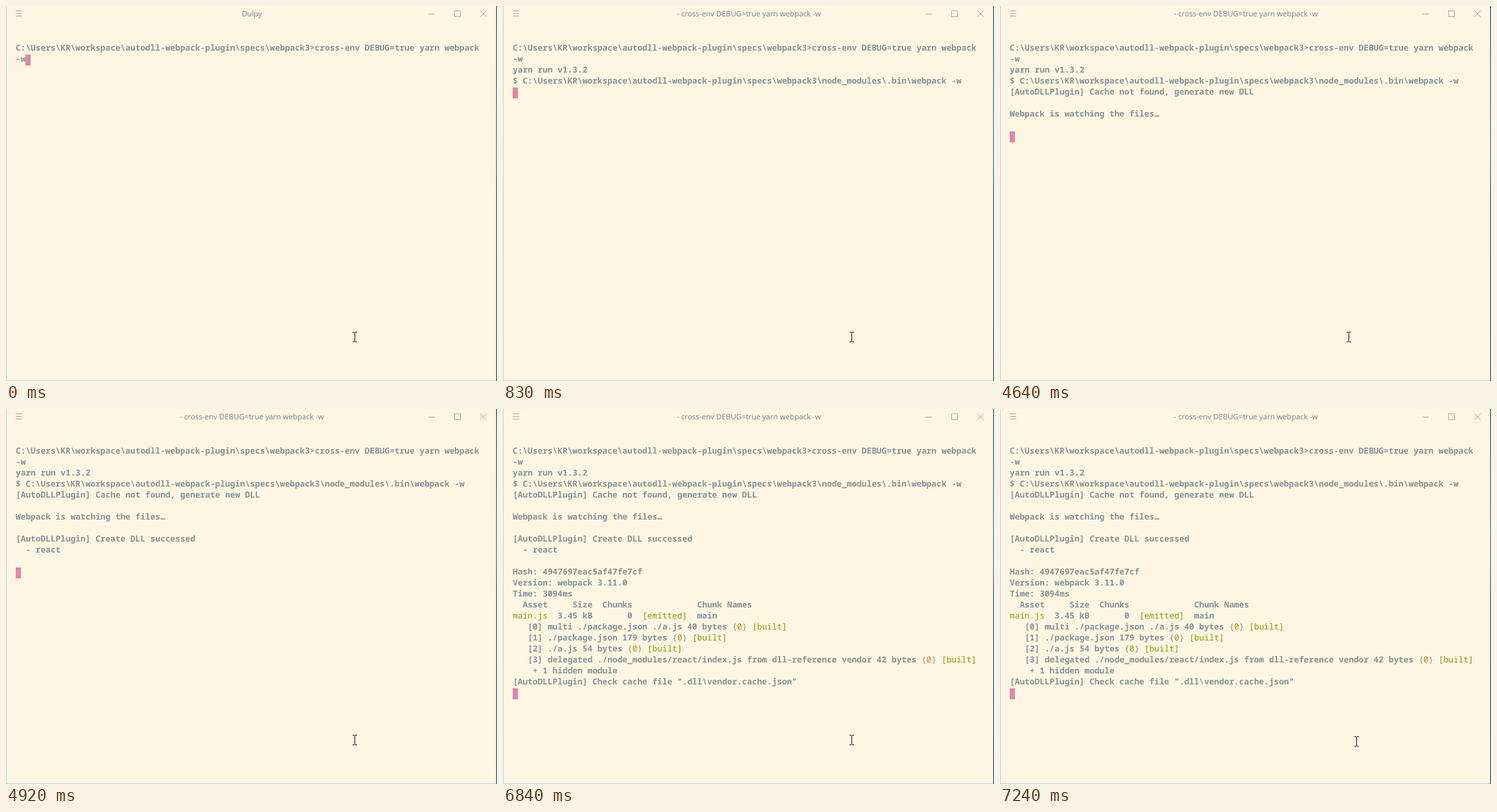
Write an HTML page with a canvas that moves like this. It is 758 px wide and 580 px high and loops after 8000 ms.

```html
<!DOCTYPE html>
<html lang="en">
<head>
<meta charset="utf-8">
<title>Terminal</title>
<style>
html, body { margin: 0; width: 100%; height: 100%; overflow: hidden; background: #fdf6e3; }
#stage { position: relative; width: 758px; height: 580px; overflow: hidden; background: #fdf6e3; }
#stage > * { position: absolute; }
#title {
  left: 0; top: 4px; width: 759px; text-align: center; color: #6f8388;
  font: 11.57px/18px "Open Sans", "Noto Sans", sans-serif;
  text-rendering: geometricPrecision; white-space: pre;
}
#text {
  left: 15px; top: 56px; margin: 0; color: #839496;
  font: bold 12.83px/17px "Noto Sans Mono", "DejaVu Sans Mono", monospace;
  text-rendering: geometricPrecision; font-variant-ligatures: none;
}
#text i { font-style: normal; font-weight: 400; }
.green { color: #859900; }
.gold { color: #b58900; }
#block { width: 8px; height: 17px; background: #e483a9; }
#chrome { left: 0; top: 0; }
</style>
</head>
<body>
<div id="stage">
  <div id="title"></div>
  <pre id="text"></pre>
  <div id="block"></div>
  <canvas id="chrome" width="758" height="580"></canvas>
</div>
<script>
const LOOP = 8000, ROW = 17, COL = 7.698;
const dir = 'C:\\Users\\KR\\workspace\\autodll-webpack-plugin\\specs\\webpack3';
const command = 'cross-env DEBUG=true yarn webpack';
const lines = [
  dir + '>' + command,
  '-w',
  'yarn run v1.3.2',
  '$ ' + dir + '\\node_modules\\.bin\\webpack -w',
  '[AutoDLLPlugin] Cache not found, generate new DLL',
  '',
  'Webpack is watching the files…',
  '',
  '[AutoDLLPlugin] Create DLL successed',
  '  - react',
  '',
  'Hash: 4947697eac5af47fe7cf',
  'Version: webpack 3.11.0',
  'Time: 3094ms',
  '  Asset     Size  Chunks             Chunk Names',
  'main.js  3.45 kB       0  [emitted]  main',
  '   [0] multi ./package.json ./a.js 40 bytes {0} [built]',
  '   [1] ./package.json 179 bytes {0} [built]',
  '   [2] ./a.js 54 bytes {0} [built]',
  '   [3] delegated ./node_modules/react/index.js from dll-reference vendor 42 bytes {0} [built]',
  '    + 1 hidden module',
  '[AutoDLLPlugin] Check cache file ".dll\\vendor.cache.json"'
];

// [start ms, printed lines]
const output = [[0, 2], [120, 2], [830, 4], [1960, 5], [4640, 8], [4920, 11], [5040, 21], [6840, 22]];
// [start ms, x, y]
const pointer = [[0, 535, 504], [7090, 537, 504], [7240, 547, 506]];

const $ = id => document.getElementById(id);
const ctx = $('chrome').getContext('2d');
const at = (steps, t) => steps.filter(s => s[0] <= t).pop();

const paint = line => line
  .replace(/>/g, '&gt;')
  .replace(/\[(built|emitted)\]|^main\.js/g, '<i class="green">$&</i>')
  .replace('{0}', '<i>{</i><i class="gold">0</i><i>}</i>');
const painted = lines.map(paint);

function rect(color, x, y, w, h) {
  ctx.fillStyle = color;
  ctx.fillRect(x, y, w, h);
}

function drawWindow() {
  const edge = '#b4d5dc', icon = '#a3ada8';
  rect(edge, 0, 0, 1, 580);
  rect(edge, 0, 579, 758, 1);
  rect(edge, 756, 0, 1, 580);
  const side = ctx.createLinearGradient(0, 0, 0, 580);
  side.addColorStop(0, '#27486a');
  side.addColorStop(0.2, '#3d6285');
  side.addColorStop(0.4, '#5d7f9b');
  side.addColorStop(0.5, '#31506f');
  side.addColorStop(1, '#2c4866');
  rect(side, 757, 0, 1, 580);

  for (const y of [8, 12, 16]) rect(icon, 15, y - 1, 10, 1);
  rect(icon, 652, 12, 10, 1);
  ctx.strokeStyle = icon;
  ctx.lineWidth = 1;
  ctx.strokeRect(692.5, 7.5, 9, 9);
  ctx.beginPath();
  ctx.moveTo(732, 7);
  ctx.lineTo(742, 17);
  ctx.moveTo(742, 7);
  ctx.lineTo(732, 17);
  ctx.stroke();
}

function drawPointer(x, y) {
  const ink = '#0b0b14';
  for (const end of [y, y + 15]) {
    rect(ink, x, end, 3, 1);
    rect(ink, x + 4, end, 3, 1);
  }
  rect(ink, x + 3, y + 1, 1, 14);
}

let shown = '';
function render(t) {
  const [start, count] = at(output, t);
  const [, px, py] = at(pointer, t);
  const key = [start, px].join();
  if (key === shown) return;
  shown = key;

  $('title').textContent = start ? '- ' + command + ' -w' : 'Dulpy';
  $('text').innerHTML = painted.slice(0, count).join('\n');
  const row = start ? count : 1;
  const col = start ? 0 : 2;
  $('block').style.left = Math.floor(15 + col * COL) + 'px';
  $('block').style.top = 58 + row * ROW + 'px';

  ctx.clearRect(0, 0, 758, 580);
  drawWindow();
  drawPointer(px, py);
}

const begin = performance.now();
function tick() {
  render((performance.now() - begin) % LOOP);
  requestAnimationFrame(tick);
}
tick();
</script>
</body>
</html>
```
